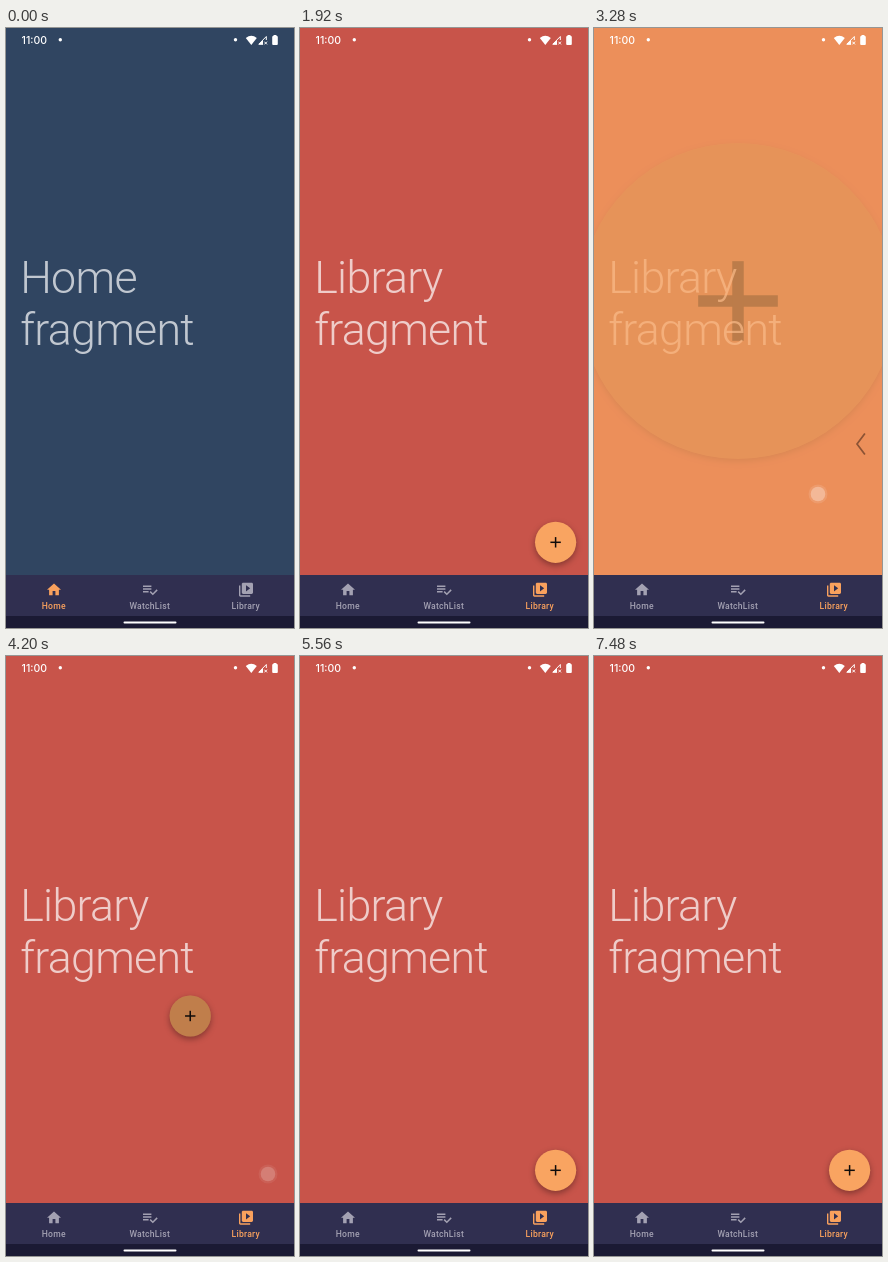
An HTML page with a canvas for the animation above (7.84 s loop, 288 by 600 pixels).

```html
<!DOCTYPE html>
<html lang="en">
<head>
<meta charset="utf-8">
<title>Fragment navigation</title>
<style>
html, body { margin: 0; width: 100%; height: 100%; overflow: hidden; background: #1c1a35; }
canvas { display: block; }
</style>
</head>
<body>
<canvas id="stage" width="288" height="600"></canvas>
<script>
const ctx = document.getElementById('stage').getContext('2d');
const LOOP = 7840, STEP = 200, SETTLE = 172;
const BLUE = '#304561', RED = '#c8544a', ORANGE = '#f9a461';
const REST = { x: 255.6, y: 514.3 }, MID = { x: 144, y: 273 };

// Each visit to the second screen: FAB start, swipe start, transition back, release point
const visits = [
  { open: 2080, swipe: 2880, back: 3229, x: 224, y: 466 },
  { open: 4083, swipe: 4840, back: 5185, x: 226, y: 456 },
  { open: 5954, swipe: 6720, back: 7075, x: 225, y: 461 }
];
const TAB_TAP = 860;

const icons = [
  ['Home', 48, 'M10 20v-6h4v6h5v-8h3L12 3 2 12h3v8z'],
  ['WatchList', 144, 'M14 10H2v2h12v-2zm0-4H2v2h12V6zM2 16h8v-2H2v2zm19.5-4.5L23 13l-6.99 7-4.51-4.5L13 14l3.01 3 5.49-5.5z'],
  ['Library', 240, 'M4 6H2v14c0 1.1.9 2 2 2h14v-2H4V6zm16-4H8c-1.1 0-2 .9-2 2v12c0 1.1.9 2 2 2h12c1.1 0 2-.9 2-2V4c0-1.1-.9-2-2-2zm-8 12.5v-9l6 4.5-6 4.5z']
].map(([label, x, d]) => ({ label, x, path: new Path2D(d) }));

const clamp = v => Math.max(0, Math.min(1, v));
const ramp = (t, from, span) => clamp((t - from) / span);
const ease = v => 0.5 - Math.cos(v * Math.PI) / 2;
const mix = (a, b, v) => a + (b - a) * v;

function withAlpha(a, draw) {
  if (a <= 0) return;
  ctx.save();
  ctx.globalAlpha *= a;
  draw();
  ctx.restore();
}

function disc(x, y, r, fill) {
  ctx.fillStyle = fill;
  ctx.beginPath();
  ctx.arc(x, y, r, 0, Math.PI * 2);
  ctx.fill();
}

function fillPage(color) {
  ctx.fillStyle = color;
  ctx.fillRect(0, 0, 288, 547);
}

function title(word, alpha) {
  withAlpha(alpha * 0.7, () => {
    ctx.fillStyle = '#fff';
    ctx.font = '340 44.7px Roboto, sans-serif';
    ctx.letterSpacing = '-0.7px';
    ctx.textAlign = 'left';
    ctx.fillText(word, 14.2, 264.9);
    ctx.fillText('fragment', 14.2, 316.8);
  });
}

// dim is the pressed shade, tint the warmer shade of the enlarged button
function fab(x, y, scale, dim, tint) {
  ctx.save();
  ctx.translate(x, y);
  ctx.scale(scale, scale);
  ctx.shadowColor = 'rgba(0,0,0,.35)';
  ctx.shadowBlur = 6;
  ctx.shadowOffsetY = 2.5;
  disc(0, 0, 20.6, ORANGE);
  ctx.shadowColor = 'transparent';
  if (dim > 0) disc(0, 0, 20.6, `rgba(0,0,0,${0.23 * dim})`);
  if (tint > 0) disc(0, 0, 20.6, `rgba(144,30,60,${0.25 * tint})`);
  ctx.fillStyle = '#100c0a';
  ctx.fillRect(-5.2, -0.75, 10.4, 1.5);
  ctx.fillRect(-0.75, -5.2, 1.5, 10.4);
  ctx.restore();
}

function touch(x, y, alpha) {
  withAlpha(alpha, () => {
    disc(x, y, 9.5, 'rgba(255,255,255,.2)');
    disc(x, y, 7.3, 'rgba(255,255,255,.52)');
  });
}

function tap(t, x, y, down, up) {
  if (t >= down) touch(x, y, ramp(t, down, 40) * (1 - ramp(t, up, 130)));
}

function swipe(t, v) {
  const s = t - v.swipe;
  if (s < 0 || s > 560) return;
  const pull = ease(ramp(s, 40, 260));
  const gone = s - 345;
  touch(mix(285, v.x, pull), mix(v.y - 5, v.y, pull), ramp(s, 0, 40) * (1 - ramp(gone, 0, 130)));
  const tip = gone < 0 ? mix(290, 253.5, pull) : 253.5 + gone * 0.17;
  const h = mix(12.5, 10, ramp(gone, 0, 70));
  withAlpha(0.75 * pull * (1 - ramp(gone, 0, 170)), () => {
    ctx.strokeStyle = '#2c1710';
    ctx.lineWidth = 1.7;
    ctx.beginPath();
    ctx.moveTo(tip + h * 0.75, v.y - 50 - h);
    ctx.lineTo(tip, v.y - 50);
    ctx.lineTo(tip + h * 0.75, v.y - 50 + h);
    ctx.stroke();
  });
}

function library(t) {
  const v = visits.find(o => t >= o.open - 80 && t < o.back + 400);
  const back = v && t >= v.back;
  let move = 0, cover = 0, dim = 0;
  if (v) {
    move = back ? 1 - ramp(t, v.back + STEP, SETTLE) : ramp(t, v.open, STEP);
    cover = back ? 1 - ramp(t, v.back, STEP) : ramp(t, v.open + STEP, STEP);
    dim = back ? ramp(move, 0, 0.5) : ramp(t, v.open - 60, 120);
  }
  const m = ease(move);
  fillPage(RED);
  const size = ease(ramp(t, TAB_TAP + 240, 220)) * (1 + 9 * cover);
  if (size > 0) fab(mix(REST.x, MID.x, m), mix(REST.y, MID.y, m), size, dim, ramp(cover, 0, 0.4));
  if (back || cover === 0) title('Library', 1);
  withAlpha(cover, () => fillPage(ORANGE));
  if (v && !back) title('Second', cover * cover);
}

function statusBar() {
  ctx.fillStyle = '#fff';
  ctx.textAlign = 'left';
  ctx.font = '500 10.5px Inter, sans-serif';
  ctx.fillText('11:00', 15.6, 15.8);
  disc(54.3, 11.8, 1.7, '#fff');
  disc(229.5, 11.8, 1.7, '#fff');

  ctx.beginPath();
  ctx.moveTo(245.3, 17);
  ctx.lineTo(239.8, 9.9);
  ctx.quadraticCurveTo(245.3, 5.6, 250.8, 9.9);
  ctx.fill();

  ctx.strokeStyle = '#fff';
  ctx.lineWidth = 1;
  ctx.beginPath();
  ctx.moveTo(260.3, 12);
  ctx.lineTo(260.3, 8.5);
  ctx.lineTo(252.8, 16.2);
  ctx.lineTo(257, 16.2);
  ctx.stroke();
  ctx.beginPath();
  ctx.moveTo(257, 12);
  ctx.lineTo(257, 16.5);
  ctx.lineTo(252.5, 16.5);
  ctx.fill();
  ctx.beginPath();
  ctx.moveTo(258.4, 13.7);
  ctx.lineTo(261, 16.4);
  ctx.moveTo(261, 13.7);
  ctx.lineTo(258.4, 16.4);
  ctx.stroke();

  ctx.fillRect(267.5, 7, 3, 2);
  ctx.beginPath();
  ctx.roundRect(266.2, 8, 5.6, 9, 1);
  ctx.fill();
}

function navBar(active) {
  ctx.fillStyle = '#302f50';
  ctx.fillRect(0, 547, 288, 41);
  ctx.fillStyle = '#1b1a34';
  ctx.fillRect(0, 588, 288, 12);
  ctx.textAlign = 'center';
  ctx.font = '500 8.6px Roboto, sans-serif';
  ctx.letterSpacing = '0.25px';
  for (const { label, x, path } of icons) {
    ctx.fillStyle = label === active ? '#f9a15d' : '#a3a1b2';
    ctx.fillText(label, x - 0.3, 580.5);
    ctx.save();
    ctx.translate(x - 8.4, 553.3);
    ctx.scale(0.7, 0.7);
    ctx.fill(path);
    ctx.restore();
  }
  ctx.letterSpacing = '0px';
  ctx.fillStyle = '#fff';
  ctx.beginPath();
  ctx.roundRect(117.5, 593.5, 53, 2, 1);
  ctx.fill();
}

function render(t) {
  ctx.clearRect(0, 0, 288, 600);
  const fade = ramp(t, TAB_TAP + 120, 220);
  if (fade < 1) {
    fillPage(BLUE);
    title('Home', 1);
  }
  withAlpha(fade, () => library(t));
  navBar(t < TAB_TAP + 100 ? 'Home' : 'Library');
  statusBar();
  tap(t, 241, 567, TAB_TAP, TAB_TAP + 120);
  for (const v of visits) {
    tap(t, 262, 518, v.open - 70, v.open + 35);
    swipe(t, v);
  }
}

const start = performance.now();
function tick() {
  render((performance.now() - start) % LOOP);
  requestAnimationFrame(tick);
}
tick();
</script>
</body>
</html>
```
